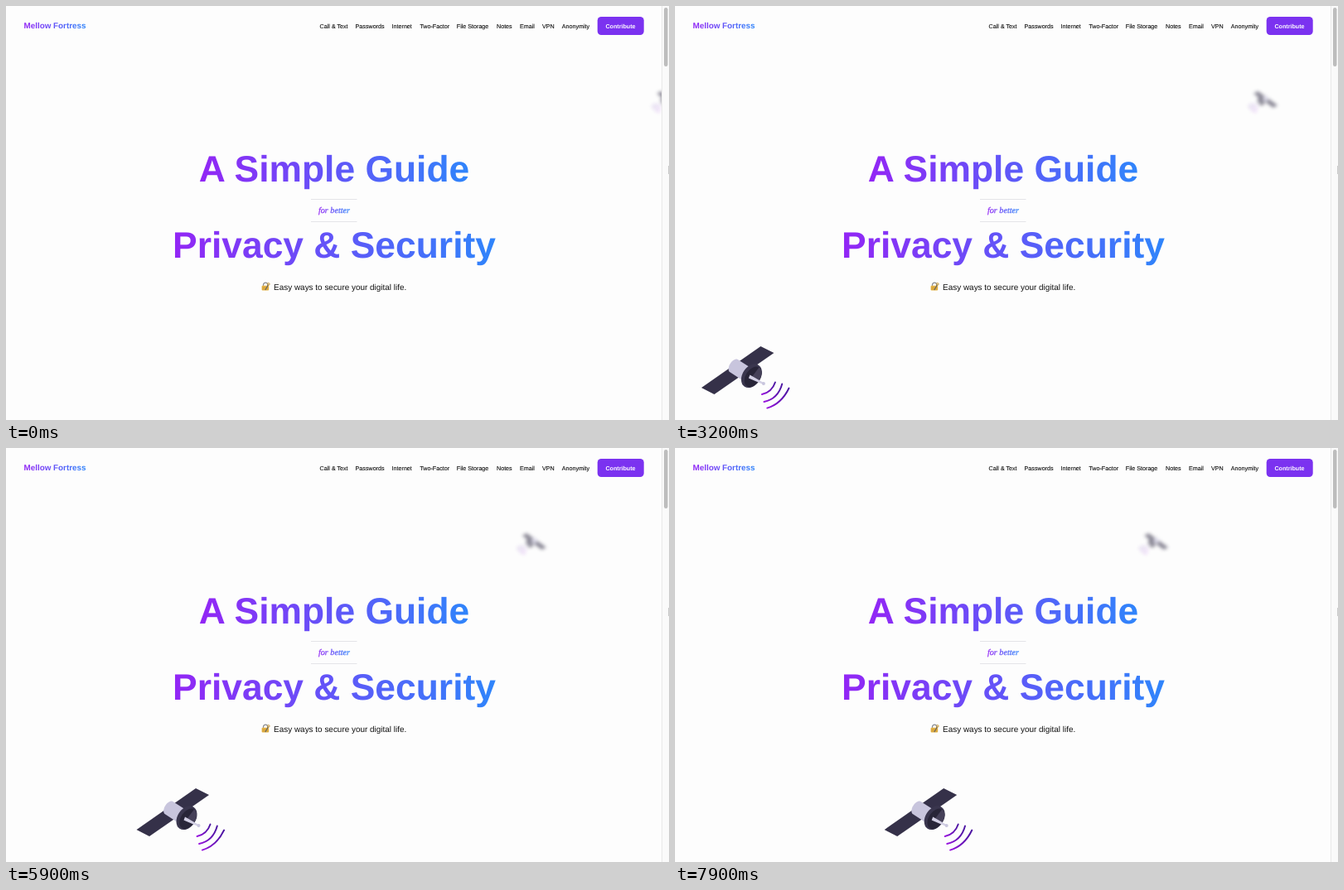
Write an HTML page that moves like this. It is 800 by 500 pixels and loops after 8000 ms.

```html
<!DOCTYPE html>
<html lang="en">
<head>
<meta charset="utf-8">
<title>Privacy guide</title>
<style>
  html, body { margin: 0; width: 100%; height: 100%; overflow: hidden; background: #fdfdfd; }
  svg { display: block; width: 800px; height: 500px; }
  text { font-family: "Liberation Sans", Arial, sans-serif; text-rendering: geometricPrecision; fill: #111; }
  .bold { font-weight: 700; }
  .hue { fill: url(#hue); }
  .mid { text-anchor: middle; }
  .title { font-size: 44.4px; }
  .nav { font-size: 7.15px; }
  #menu text { stroke: #111; stroke-width: .12px; }
  .aside { font: italic 10.2px "Liberation Serif", "Times New Roman", serif; stroke: url(#hue); stroke-width: .25px; }
  .blur { filter: blur(2px); opacity: .6; }
</style>
</head>
<body>
<svg viewBox="0 0 800 500">
  <defs>
    <linearGradient id="hue">
      <stop stop-color="#9326f5"/><stop offset="1" stop-color="#2f85fb"/>
    </linearGradient>
    <linearGradient id="wave">
      <stop stop-color="#9a12e0"/><stop offset="1" stop-color="#4a14a0"/>
    </linearGradient>
    <g id="satellite">
      <path d="M0 50L71.5 0L87.5 8L15.5 58Z" fill="#353149"/>
      <g transform="translate(44.5 27) rotate(33)">
        <path d="M-7-9H14V9H-7C-13 7-13-7-7-9Z" fill="#c8c5dd"/>
      </g>
      <g transform="translate(60.5 35.7) rotate(33)">
        <ellipse rx="11" ry="15.5" fill="#3a364e"/>
        <ellipse cx="2" rx="8.7" ry="13.5" fill="#282538"/>
        <path d="M2-13.5A8.7 13.5 0 0 1 10.7 0L1 1Z" fill="#464159"/>
      </g>
      <path d="M58.5 34.5L75 44L74.5 46L57 38.5Z" fill="#d2cfe4"/>
      <circle cx="75" cy="45" r="2" fill="#c8c5dd"/>
      <g fill="none" stroke="url(#wave)" stroke-width="1.9" stroke-linecap="round">
        <path d="M73 58Q85 55.5 89 43.5"/>
        <path d="M75.5 67Q92.5 63.5 97.3 45.5"/>
        <path d="M79.3 74.6Q96.5 69.5 105.6 50.5"/>
      </g>
    </g>
  </defs>

  <rect width="800" height="500" fill="#fdfdfd"/>
  <g class="blur"><use id="far" href="#satellite"/></g>
  <use id="near" href="#satellite"/>

  <text class="bold hue" x="21.5" y="27" font-size="9.85">Mellow Fortress</text>
  <g id="menu"></g>
  <rect x="713.7" y="13" width="56" height="22" rx="4.5" fill="#7b32f0"/>
  <text class="bold nav mid" x="741.5" y="26.5" style="fill:#fff">Contribute</text>

  <text class="bold hue title mid" x="396" y="211.7">A Simple Guide</text>
  <path d="M368 233.5H423.5M368 260.5H423.5" stroke="#e4e4e8"/>
  <text class="hue aside mid" x="396" y="250">for better</text>
  <text class="bold hue title mid" x="396" y="303.8">Privacy &amp; Security</text>

  <!-- lock with key -->
  <path d="M310.5 339V336.8A2.6 2.6 0 0 1 315.7 336.8V339" fill="none" stroke="#8d9096" stroke-width="1.3"/>
  <rect x="308.6" y="337.8" width="8.6" height="5.8" rx="1" fill="#e6b548"/>
  <path d="M309 340H316.8M309 342H316.8" stroke="#b98421" stroke-width=".5"/>
  <path d="M316.6 336.5L312.8 343" stroke="#5d6068" stroke-width="1.1"/>
  <circle cx="316.8" cy="335.9" r="1.3" fill="none" stroke="#c99a35"/>
  <text x="323.1" y="342.8" font-size="9.95">Easy ways to secure your digital life.</text>

  <rect x="791.5" width="8.5" height="500" fill="#fafafa"/>
  <path d="M791.5 0V500" stroke="#e9e9e9"/>
  <rect x="794" y="2" width="4.5" height="71" rx="2.2" fill="#bdbdbd"/>
  <rect x="799" y="193" width="1" height="10" fill="#ccc"/>
</svg>
<script>
  const LOOP = 8000, STEP = 100;
  const byId = id => document.getElementById(id);

  const links = {
    "Call & Text": 378.6, "Passwords": 421.6, "Internet": 465.6, "Two-Factor": 499.4,
    "File Storage": 543.8, "Notes": 592, "Email": 620, "VPN": 647, "Anonymity": 670.8
  };
  for (const [label, x] of Object.entries(links)) {
    const link = document.createElementNS("http://www.w3.org/2000/svg", "text");
    link.setAttribute("class", "nav");
    link.setAttribute("x", x);
    link.setAttribute("y", 26.5);
    link.textContent = label;
    byId("menu").append(link);
  }

  // Both satellites drift with a slight acceleration.
  function draw(ms) {
    const s = ms / 1000 - 3.2;
    const near = 31.9 + 45.9 * s + 0.23 * s * s;
    const far = 727 - 27.6 * s - 0.1 * s * s;
    byId("near").setAttribute("transform", `translate(${near} 411)`);
    byId("far").setAttribute("transform", `translate(${far} 103) scale(-.33 .34)`);
  }

  const start = performance.now();
  function tick() {
    const ms = (performance.now() - start) % LOOP;
    draw(Math.floor(ms / STEP) * STEP);
    requestAnimationFrame(tick);
  }
  tick();
</script>
</body>
</html>
```
